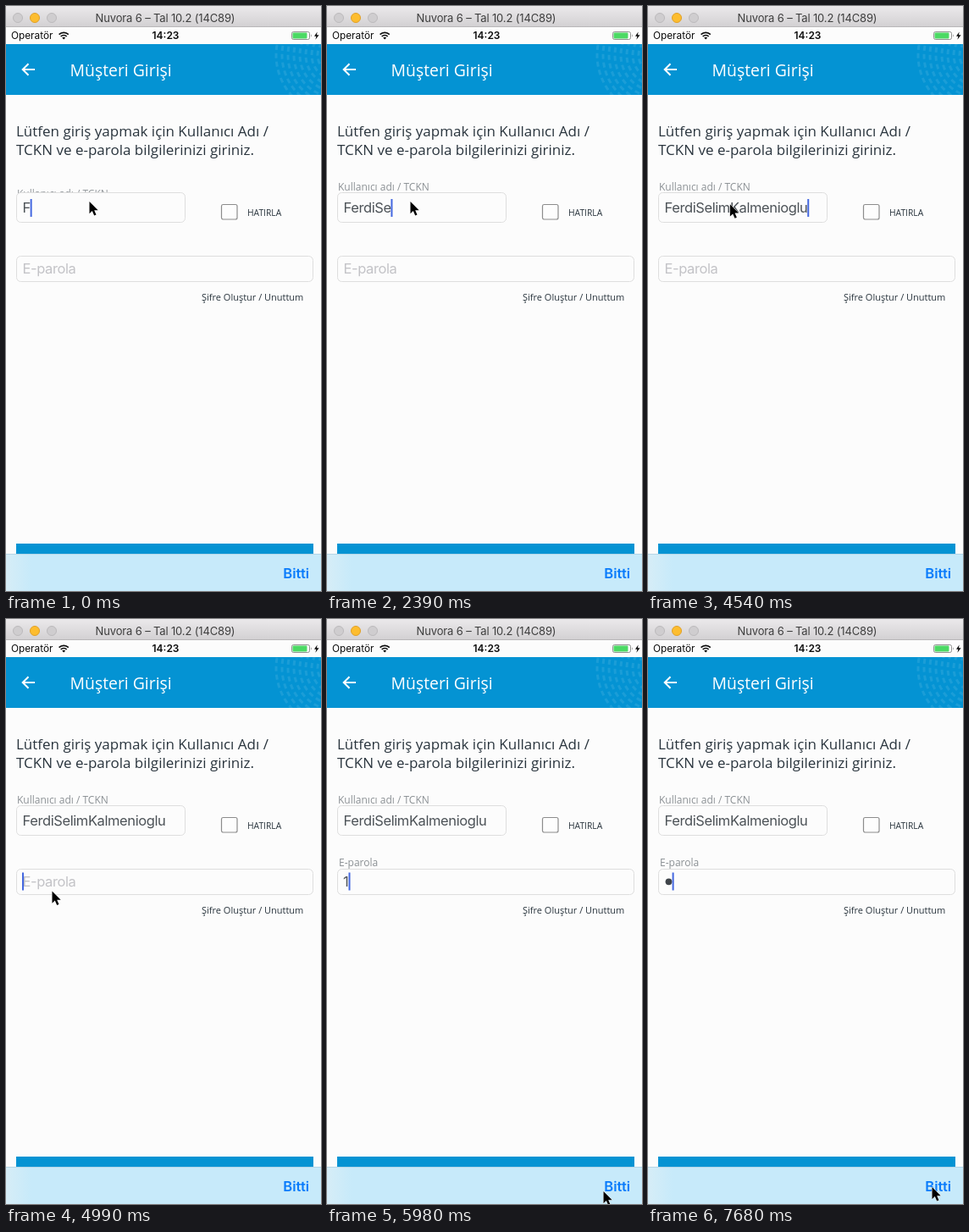
An HTML page that plays this animation: 372x691 px, repeating every 8000 ms.

```html
<!DOCTYPE html>
<html lang="tr">
<head>
<meta charset="utf-8">
<title>Müşteri Girişi</title>
<style>
  html, body { margin: 0; width: 100%; height: 100%; overflow: hidden; background: #fcfcfc; }
  svg { display: block; width: 100%; height: 100%; }
  .ui { font-family: Inter, "Liberation Sans", sans-serif; }
  .app { font-family: "Open Sans", "Noto Sans", sans-serif; }
  .input { font-size: 16.5px; letter-spacing: -.4px; fill: #4c5257; }
  .hint { fill: #c3c3c7; }
  .label { font-size: 12px; fill: #8b9094; }
  .intro { font-size: 17px; font-weight: 500; fill: #29343d; }
  .small { fill: #29343d; }
  .box { fill: #fcfcfc; stroke: #dedede; }
</style>
</head>
<body>
<svg viewBox="0 0 372 691" xmlns="http://www.w3.org/2000/svg">
  <defs>
    <linearGradient id="chrome" x2="0" y2="1">
      <stop stop-color="#ebe9eb"/><stop offset="1" stop-color="#d2d0d2"/>
    </linearGradient>
    <linearGradient id="glass">
      <stop stop-color="#d6edf7"/><stop offset=".08" stop-color="#c7eafa"/><stop offset="1" stop-color="#c7eafa"/>
    </linearGradient>
    <clipPath id="head"><rect y="45" width="372" height="60"/></clipPath>
  </defs>
  <rect width="372" height="691" fill="#fcfcfc"/>

  <!-- window bar -->
  <rect width="372" height="25" fill="url(#chrome)"/>
  <rect y="24" width="372" height="1" fill="#b9b7b9"/>
  <g stroke="#bcbabc" fill="#cfcdcf">
    <circle cx="14" cy="14" r="5.5"/>
    <circle cx="34" cy="14" r="5.5" fill="#fdbd2f" stroke="#e0a028"/>
    <circle cx="54" cy="14" r="5.5"/>
  </g>
  <text class="ui" x="188" y="19" text-anchor="middle" font-size="13" letter-spacing="-.15" fill="#3e3e3e">Nuvora 6 – Tal 10.2 (14C89)</text>

  <!-- status bar -->
  <g class="ui" fill="#0c0c0c">
    <text x="6" y="39.3" font-size="11.8">Operatör</text>
    <text x="188.5" y="39.3" text-anchor="middle" font-size="12" font-weight="600">14:23</text>
  </g>
  <g fill="none" stroke="#0c0c0c" stroke-width="1.7">
    <path d="M62.6 33.6a8 8 0 0 1 11.2 0M64.7 36a5 5 0 0 1 7 0"/>
    <path d="M66.2 37.6a3 3 0 0 1 4 0l-2 2z" fill="#0c0c0c" stroke="none"/>
  </g>
  <rect x="337.5" y="30.5" width="21" height="9" rx="2" fill="#fff" stroke="#777" stroke-width=".8"/>
  <rect x="338.5" y="31.5" width="17" height="7" rx="1" fill="#4cd964"/>
  <path d="M360 33.2q1.6 1.8 0 3.6z" fill="#777"/>
  <path d="M367.6 30.5L364 35.8h2.4l-1 4 4.2-5.6h-2.6z" fill="#0c0c0c"/>

  <!-- header -->
  <rect y="45" width="372" height="60" fill="#0493d3"/>
  <g id="rings" clip-path="url(#head)" fill="none" stroke="#4bb3e0" stroke-width="3" stroke-dasharray="6 4" opacity=".32"/>
  <path d="M34 75H20M26.5 68.2L19.7 75l6.8 6.8" fill="none" stroke="#fff" stroke-width="2"/>
  <text class="app" x="75.5" y="83" font-size="19.4" font-weight="500" fill="#fff">Müşteri Girişi</text>

  <!-- form -->
  <g class="app">
    <text class="intro" x="12" y="153.5">Lütfen giriş yapmak için Kullanıcı Adı /</text>
    <text class="intro" x="12" y="176.3">TCKN ve e-parola bilgilerinizi giriniz.</text>
    <text class="label" id="userLabel" x="13">Kullanıcı adı / TCKN</text>
    <text class="label" id="passLabel" x="14">E-parola</text>
    <text class="small" x="285" y="247.7" font-size="10.3">HATIRLA</text>
    <text class="small" x="231" y="347.5" font-size="11">Şifre Oluştur / Unuttum</text>
  </g>
  <rect class="box" x="12.5" y="220.5" width="199" height="35" rx="5"/>
  <rect class="box" x="12.5" y="295.5" width="350" height="30" rx="5"/>
  <rect x="254.5" y="234.5" width="18.5" height="17.5" rx="2" fill="#fdfdfd" stroke="#8c8c8c" stroke-width="1.2"/>
  <text class="ui input" id="user" x="19.5" y="244.2"></text>
  <text class="ui input hint" id="hint" x="19.5" y="316">E-parola</text>
  <text class="ui input" id="digit" x="19" y="316">1</text>
  <circle id="dot" cx="24.5" cy="310.3" r="3.9" fill="#3f4449"/>
  <rect id="caret" width="2" height="21" fill="#4468e0"/>

  <!-- bottom bar -->
  <rect x="12" y="635" width="351" height="12" fill="#0493d3"/>
  <rect y="647" width="372" height="44" fill="url(#glass)"/>
  <rect y="647" width="372" height="1" fill="#a6c9da" opacity=".6"/>
  <text class="ui" x="327.3" y="676" font-size="16.6" font-weight="600" letter-spacing="-.1" fill="#0a7cfb">Bitti</text>

  <path id="mouse" d="M0 0V14.2L3.3 11.1 5.7 16.4 8 15.4 5.7 10.2H10.2Z" fill="#000" stroke="#fff" stroke-width="1" paint-order="stroke"/>
</svg>
<script>
const LOOP = 8000;
const NAME = "FerdiSelimKalmenioglu";
const KEYS = [0, 180, 290, 400, 520, 2100, 2390, 2480, 2570, 2780, 3080,
  3230, 3380, 3480, 3580, 3680, 3800, 3860, 4010, 4060, 4240];
const FOCUS = 4950, DIGIT = 5530, MASK = 7530;
// time, x, y
const PATH = [[4490, 98.5, 231], [4930, 54.5, 321.5], [5540, 54.5, 321.5], [5970, 326.5, 676],
  [6330, 332.5, 675], [6600, 335.5, 671]];

const $ = id => document.getElementById(id);
const clamp = v => Math.max(0, Math.min(1, v));
const ease = v => v * v * (3 - 2 * v);
const set = (el, attrs) => { for (const k in attrs) el.setAttribute(k, attrs[k]); };
const show = (id, on) => $(id).setAttribute("opacity", on ? 1 : 0);

for (let r = 22; r < 72; r += 7) {
  const ring = document.createElementNS("http://www.w3.org/2000/svg", "circle");
  set(ring, { cx: 390, cy: 58, r, "stroke-dashoffset": r });
  $("rings").append(ring);
}

function mouseAt(t) {
  const i = PATH.findIndex(p => p[0] > t);
  if (i === 0) return PATH[0].slice(1);
  if (i < 0) return PATH[PATH.length - 1].slice(1);
  const a = PATH[i - 1], b = PATH[i];
  const p = ease((t - a[0]) / (b[0] - a[0]));
  return [1, 2].map(k => a[k] + (b[k] - a[k]) * p);
}

function floatLabel(id, t, start, base) {
  const p = clamp((t - start) / 330);
  set($(id), { y: base + 10 * (1 - ease(p)), opacity: clamp(p * 3) });
}

// solid after each key, then a soft blink once a second
function caretAlpha(t) {
  if (t >= MASK) return clamp((t - MASK) / 150);
  const last = [...KEYS, FOCUS, DIGIT].filter(k => k <= t).pop();
  const age = t - last - 570;
  if (age < 0) return 1;
  const m = age % 1000;
  return m < 300 ? 1 - clamp(m / 190) : clamp((m - 540) / 110);
}

function render(t) {
  const text = NAME.slice(0, KEYS.filter(k => k <= t).length);
  if ($("user").textContent !== text) $("user").textContent = text;
  floatLabel("userLabel", t, -100, 218);
  floatLabel("passLabel", t, DIGIT, 292.3);
  show("hint", t < DIGIT);
  show("digit", t >= DIGIT && t < MASK);
  show("dot", t >= MASK);

  let x = 19.3 + $("user").getComputedTextLength();
  if (t >= FOCUS) x = t < DIGIT ? 19 : t < MASK ? 25.5 : 28.6;
  set($("caret"), { x, y: t < FOCUS ? 228 : 299.5, opacity: caretAlpha(t) });
  set($("mouse"), { transform: `translate(${mouseAt(t)})` });
}

const begin = performance.now();
function tick() {
  render((performance.now() - begin) % LOOP);
  requestAnimationFrame(tick);
}
tick();
</script>
</body>
</html>
```
